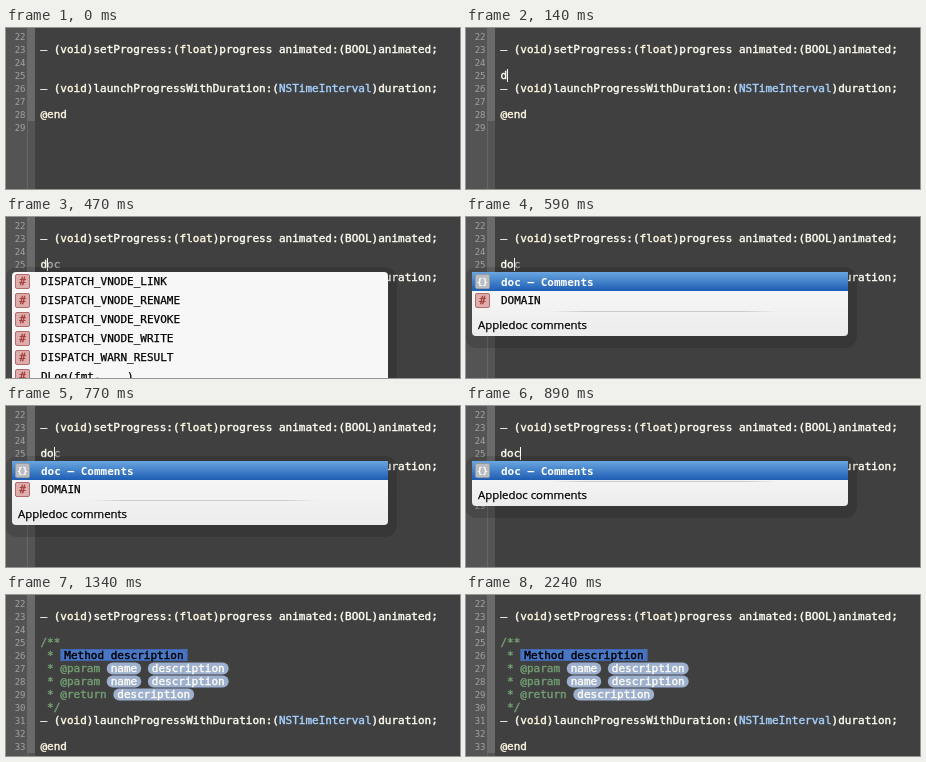
Recreate the animation shown at these times as an HTML page. Size 454x161 px, loop 2840 ms.

```html
<!DOCTYPE html>
<html lang="en">
<head>
<meta charset="utf-8">
<title>Code completion</title>
<style>
  html, body { margin: 0; width: 100%; height: 100%; overflow: hidden; background: #404040; }
  svg { display: block; }
  text { white-space: pre; }
  .code { font: 11px "DejaVu Sans Mono", monospace; stroke-width: .4px; }
  .num { font: 9px "DejaVu Sans Mono", monospace; fill: #a2a2a2; text-anchor: end; }
  .info { font: 11.4px "Open Sans", sans-serif; fill: #000; stroke: #000; stroke-width: .25px; }
</style>
</head>
<body>
<svg id="stage" width="454" height="161" viewBox="0 0 454 161">
  <defs>
    <linearGradient id="blue" x2="0" y2="1">
      <stop stop-color="#6aa6e0"/><stop offset="1" stop-color="#1d5db3"/>
    </linearGradient>
    <linearGradient id="panel" x2="0" y2="1">
      <stop stop-color="#fafafa"/><stop offset="1" stop-color="#ececec"/>
    </linearGradient>
    <linearGradient id="rule">
      <stop stop-color="#ccc" stop-opacity="0"/><stop offset=".15" stop-color="#ccc"/>
      <stop offset=".85" stop-color="#ccc"/><stop offset="1" stop-color="#ccc" stop-opacity="0"/>
    </linearGradient>
  </defs>
  <g id="view"></g>
</svg>
<script>
const LOOP = 2840;
const LEFT = 34.5, CHAR = 6.622, LINE = 13, TOP = 55, ROW = 19, PAD = 4;
const INK = '#fffdf2', KEYWORD = '#fff9e2', TYPE = '#a6d1ff', COMMENT = '#739e73', GHOST = '#a4a4a4';

const MACROS = ['DISPATCH_VNODE_LINK', 'DISPATCH_VNODE_RENAME', 'DISPATCH_VNODE_REVOKE',
  'DISPATCH_VNODE_WRITE', 'DISPATCH_WARN_RESULT', 'DLog(fmt, ...)'];
const SNIPPET = 'doc – Comments';

const STATES = [
  { at: 0 },
  { at: 140, typed: 'd' },
  { at: 290, typed: 'd', ghost: 'oc', menu: MACROS },
  { at: 590, typed: 'do', ghost: 'c', menu: [SNIPPET, 'DOMAIN'] },
  { at: 890, typed: 'doc', menu: [SNIPPET] },
  { at: 1340, expanded: true },
];

const rect = (x, y, w, h, fill, extra = '') =>
  `<rect x="${x}" y="${y}" width="${w}" height="${h}" fill="${fill}" ${extra}/>`;
const code = (x, y, str, fill = INK, extra = '') =>
  `<text class="code" x="${x}" y="${y}" fill="${fill}" stroke="${fill}" ${extra}>${str}</text>`;
const baseline = line => 12 + (line - 22) * LINE;

// Lays out [text, colour] runs and { token } pills from left to right.
function codeLine(line, ...parts) {
  const y = baseline(line);
  let x = LEFT, out = '';
  for (const part of parts) {
    if (part.token) {
      const w = part.token.length * CHAR + 2 * PAD;
      out += part.selected
        ? rect(x, y - 10, w, 12, '#4a72bd') +
          rect(x + .5, y - 9.5, w - 1, 11, '#4a76c6', 'rx="5.5" stroke="#3f66b0"')
        : rect(x, y - 9.5, w, 12, '#9db0cf', 'rx="6"');
      out += code(x + PAD, y, part.token, part.selected ? '#000' : INK);
      x += w;
    } else {
      const [str, fill] = [].concat(part);
      out += code(x, y, str, fill);
      x += str.length * CHAR;
    }
  }
  return out;
}

function gutter(last, scopeEnd) {
  let out = rect(0, 0, 29, 161, '#545454') + rect(21, 0, 1, 161, '#666') +
    rect(21, 0, 8, baseline(scopeEnd) + 3, '#6a6a6a');
  for (let n = 22; n <= last; n++) {
    out += `<text class="num" x="19.5" y="${baseline(n) - .5}">${n}</text>`;
  }
  return out;
}

function docComment() {
  const name = { token: 'name' }, description = { token: 'description' };
  const param = n => codeLine(n, [' * @param ', COMMENT], name, ' ', description);
  return codeLine(25, ['/**', COMMENT]) +
    codeLine(26, [' * ', COMMENT], { token: 'Method description', selected: true }) +
    param(27) + param(28) +
    codeLine(29, [' * @return ', COMMENT], description) +
    codeLine(30, [' */', COMMENT]);
}

function menuRow(label, i) {
  const y = TOP + i * ROW, snippet = label === SNIPPET;
  const [face, edge, mark, glyph] = snippet
    ? ['#b9bcc0', '#989ca2', '#fff', '{}'] : ['#e0adad', '#b06c6c', '#a03c3c', '#'];
  return (snippet ? rect(6, y, 376, ROW, 'url(#blue)') : '') +
    rect(9.5, y + 2.5, 14, 14, face, `stroke="${edge}" rx="1.5"`) +
    code(16.5, y + 13, glyph, mark, `text-anchor="middle" style="font-size:${snippet ? 9 : 11}px"`) +
    code(LEFT + .5, y + (snippet ? 14 : 13), label, snippet ? '#fff' : '#000',
      `style="${snippet ? 'font-weight:bold;stroke:none' : 'stroke-width:.25px'}"`);
}

function popup(labels) {
  const long = labels === MACROS;
  const end = TOP + labels.length * ROW;
  const bottom = long ? 190 : end + 26;
  let out = rect(-1, 50, 392, bottom - 38, '#000', 'opacity=".14" rx="12"') +
    rect(6, TOP, 376, bottom - TOP, long ? '#f7f7f7' : 'url(#panel)', 'rx="4"') +
    labels.map(menuRow).join('');
  if (!long) {
    out += rect(83, end + 1, 230, 1, 'url(#rule)') +
      `<text class="info" x="12" y="${end + 19}">Appledoc comments</text>`;
  }
  return out;
}

function draw({ typed = '', ghost = '', menu, expanded }) {
  const shift = expanded ? 5 : 0;
  let out = rect(0, 0, 454, 161, '#404040') + gutter(expanded ? 33 : 29, 28 + shift) +
    codeLine(23, '– (', ['void', KEYWORD], ')setProgress:(', ['float', KEYWORD],
      ')progress animated:(BOOL)animated;') +
    codeLine(26 + shift, '– (', ['void', KEYWORD], ')launchProgressWithDuration:(',
      ['NSTimeInterval', TYPE], ')duration;') +
    codeLine(28 + shift, ['@end', KEYWORD]);
  if (expanded) out += docComment();
  if (typed) {
    out += codeLine(25, typed, [ghost, GHOST]) +
      rect(Math.round(LEFT + typed.length * CHAR), 41, 1, 13, INK);
  }
  if (menu) out += popup(menu);
  return out;
}

const view = document.getElementById('view');
const start = performance.now();
let shown;

function tick() {
  const time = (performance.now() - start) % LOOP;
  const state = STATES.findLast(s => s.at <= time);
  if (state !== shown) {
    shown = state;
    view.innerHTML = draw(state);
  }
  requestAnimationFrame(tick);
}
tick();
</script>
</body>
</html>
```
